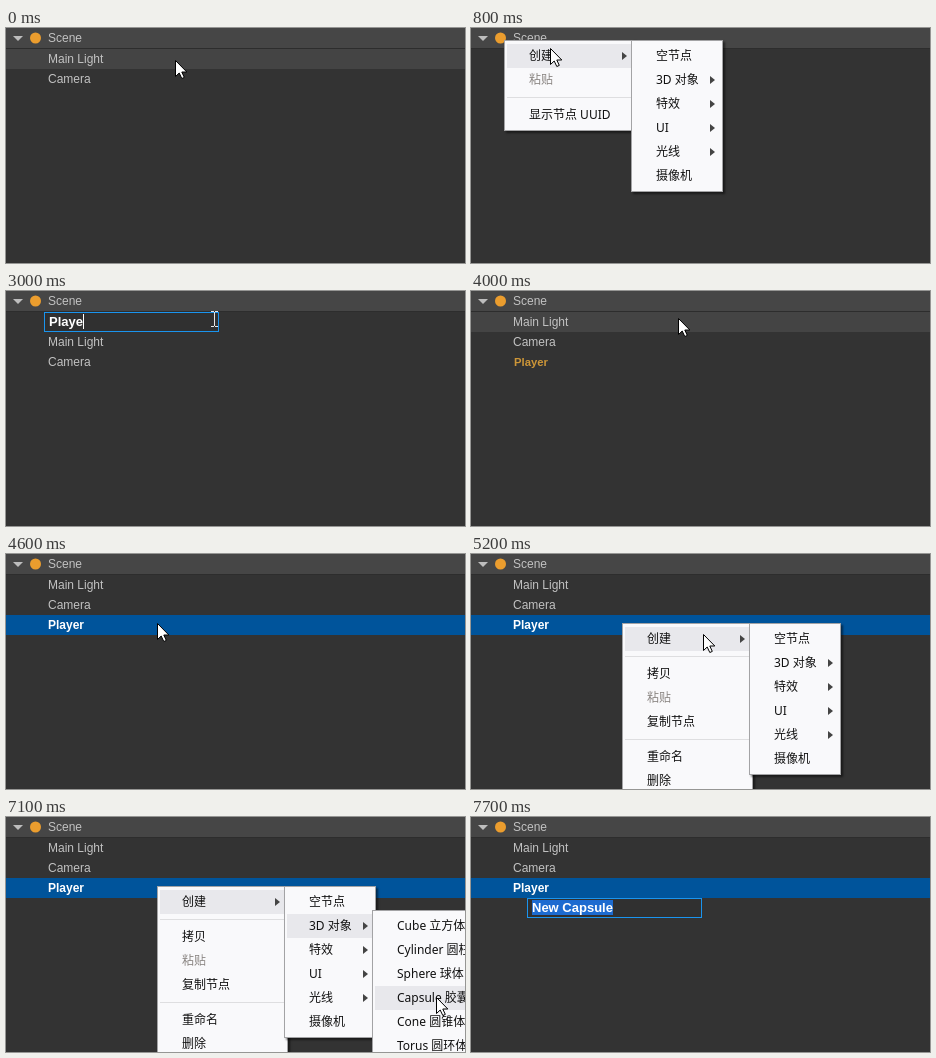
These frames come from a looping animation (459 by 235 pixels, 8000 ms). An HTML page:

```html
<!DOCTYPE html>
<html lang="zh-CN">
<head>
<meta charset="utf-8">
<title>Node tree</title>
<style>
  html, body { margin: 0; width: 100%; height: 100%; overflow: hidden; background: #333; }
  #stage {
    position: relative; width: 459px; height: 235px; overflow: hidden;
    background: #333; color: #c2c2c2; cursor: default; user-select: none;
    font: 12px/20px "Liberation Sans", Arial, sans-serif;
  }
  #stage > * { position: absolute; }

  .row { left: 0; width: 417px; height: 20px; padding-left: 42px; white-space: pre; }
  .hover { background: #444; }
  .scene { top: 0; background: #464646; border-bottom: 1px solid #2d2d2d; }
  .scene svg { position: absolute; left: 0; top: 0; }
  .selected { background: #00549b; color: #fff; font-weight: bold; }
  #flash span { display: inline-block; font-weight: bold; }

  .edit {
    width: 173px; height: 18px; border: 1px solid #1a94ee; background: #303030;
    color: #fff; font-size: 13px; font-weight: bold; white-space: pre;
  }
  .edit span { position: absolute; left: 4px; top: 1px; height: 15px; line-height: 15px; }
  .edit .marked { background: #1d6bd0; }
  .edit .caret { border-right: 1px solid #fff; }

  .menu {
    box-sizing: border-box; padding: 3px 2px; border: 1px solid #a3a3a5;
    background: #f9f9fb; color: #111; box-shadow: 2px 2px 2px rgba(0, 0, 0, .5);
    font: 12px/24px "Noto Sans", "Noto Sans CJK SC", sans-serif;
  }
  .item { position: relative; height: 24px; padding-left: 22px; white-space: pre; }
  .item.on { background: #e8e8ec; }
  .item.off { color: #8a8582; }
  .item.more::after {
    content: ""; position: absolute; right: 5px; top: 8px;
    border: solid transparent; border-width: 4px 0 4px 5px; border-left-color: #444;
  }
  .line { height: 1px; margin: 5px 0; background: #dedee0; }
  #arrow, #beam { left: 0; top: 0; overflow: visible; }
</style>
</head>
<body>
<div id="stage">
  <div class="row scene">Scene<svg width="40" height="20">
    <path d="M7 8H17L12 13Z" fill="#bdbdbd"/>
    <circle cx="29.5" cy="10" r="5.5" fill="#eb9d2e"/>
  </svg></div>

  <div class="row hover" style="top:21px" data-on="0-2 35-42"></div>
  <div class="row hover" style="top:41px" data-on="42-43"></div>
  <div class="row hover" style="top:61px" data-on="43-46"></div>
  <div class="row" id="light">Main Light</div>
  <div class="row" id="camera">Camera</div>
  <div class="row" id="flash" style="top:61px" data-on="35-46"><span>Player</span></div>
  <div class="row selected" style="top:61px" data-on="46-80">Player</div>

  <div class="edit" style="left:38px;top:21px" data-on="16-35"><span id="typed"></span></div>
  <div class="edit" style="left:56px;top:81px" data-on="76-80"><span class="marked">New Capsule</span></div>
</div>

<script>
  // All times are in ticks of 100 ms.
  const TICK = 100, TICKS = 80;
  const stage = document.getElementById('stage');
  const find = id => document.getElementById(id);

  // Item: [label, flags, ticks when highlighted]; null is a separator.
  function addMenu(x, y, width, on, items) {
    const menu = document.createElement('div');
    menu.className = 'menu';
    menu.style.cssText = `left:${x}px;top:${y}px;width:${width}px`;
    menu.dataset.on = on;
    for (const item of items) {
      const el = document.createElement('div');
      if (item) {
        const [label, flags = '', lit = ''] = item;
        el.textContent = label;
        el.className = 'item ' + flags;
        if (lit) el.dataset.lit = lit;
      } else {
        el.className = 'line';
      }
      menu.append(el);
    }
    stage.append(menu);
  }

  const createItems = (emptyLit, objectLit) => [
    ['空节点', '', emptyLit], ['3D 对象', 'more', objectLit], ['特效', 'more'],
    ['UI', 'more'], ['光线', 'more'], ['摄像机']
  ];

  addMenu(33, 12, 131, '4-16', [
    ['创建', 'more', '6-16'], ['粘贴', 'off'], null, ['显示节点 UUID']
  ]);
  addMenu(160, 12, 92, '8-16', createItems('11-16'));
  addMenu(151, 69, 131, '48-75', [
    ['创建', 'more', '50-75'], null, ['拷贝'], ['粘贴', 'off'], ['复制节点'],
    null, ['重命名'], ['删除']
  ]);
  addMenu(278, 69, 92, '52-75', createItems('56-60', '60-75'));
  addMenu(366, 93, 131, '61-75', [
    ['Cube 立方体', '', '65-67'], ['Cylinder 圆柱体', '', '67-69'],
    ['Sphere 球体', '', '69-71'], ['Capsule 胶囊体', '', '71-75'],
    ['Cone 圆锥体'], ['Torus 圆环体']
  ]);

  stage.insertAdjacentHTML('beforeend', `
    <svg id="arrow" width="13" height="20" data-on="0-16 35-77">
      <path d="M.5 .5V16.5L4.2 13L6.8 18.5L9.3 17.4L6.8 12H11.8Z" fill="#fff" stroke="#000"/>
    </svg>
    <svg id="beam" width="8" height="17" style="left:205px;top:20px" data-on="16-35">
      <path d="M0 .5H3M4 .5H7M3.5 1V15M0 15.5H3M4 15.5H7" fill="none" stroke="#e6e6e6"/>
    </svg>`);

  // Pointer path: tick, x, y
  const path = [
    [0, 169, 32], [1, 140, 27], [3, 33, 12], [4, 33, 12], [8, 79, 20], [9, 92, 22],
    [11, 170, 26], [13, 207, 27], [40, 207, 27], [43, 151, 67], [44, 151, 69],
    [49, 151, 69], [52, 232, 80], [53, 232, 80], [57, 300, 91], [60, 326, 97],
    [62, 328, 97], [65, 372, 108], [67, 402, 130], [71, 430, 180], [72, 431, 180],
    [TICKS, 431, 180]
  ];
  const keys = [25, 26, 28, 29, 30, 31];

  function pointerAt(tick) {
    const i = path.findIndex(p => p[0] > tick);
    const [t0, x0, y0] = path[i - 1], [t1, x1, y1] = path[i];
    const k = (tick - t0) / (t1 - t0);
    return [Math.round(x0 + (x1 - x0) * k), Math.round(y0 + (y1 - y0) * k)];
  }

  const within = (spans, tick) => spans.split(' ').some(span => {
    const [from, to] = span.split('-').map(Number);
    return tick >= from && tick < to;
  });

  const timed = [...stage.querySelectorAll('[data-on]')];
  const lit = [...stage.querySelectorAll('[data-lit]')];
  const typed = find('typed'), flash = find('flash').firstChild;

  function draw(tick) {
    for (const el of timed) el.style.visibility = within(el.dataset.on, tick) ? 'visible' : 'hidden';
    for (const el of lit) el.classList.toggle('on', within(el.dataset.lit, tick));

    const shift = within('16-35', tick) ? 20 : 0;
    find('light').style.top = 21 + shift + 'px';
    find('camera').style.top = 41 + shift + 'px';

    const count = keys.filter(key => key <= tick).length;
    typed.textContent = count ? 'Player'.slice(0, count) : 'New Node';
    typed.className = count ? 'caret' : 'marked';

    // The new node grows to full size while its orange fades.
    const grow = Math.min(1, Math.max(0, (tick - 35) / 8));
    const fade = Math.max(0, (grow - .625) / .375) * 100;
    flash.style.transform = `scale(${.85 + .15 * grow})`;
    flash.style.color = `color-mix(in srgb, #c2c2c2 ${fade}%, #cd9638)`;

    const [x, y] = pointerAt(tick);
    find('arrow').style.transform = `translate(${x}px, ${y}px)`;
  }

  const start = performance.now();
  let shown = -1;
  function frame() {
    const tick = Math.floor((performance.now() - start) / TICK) % TICKS;
    if (tick !== shown) draw(shown = tick);
    requestAnimationFrame(frame);
  }
  frame();
</script>
</body>
</html>
```
